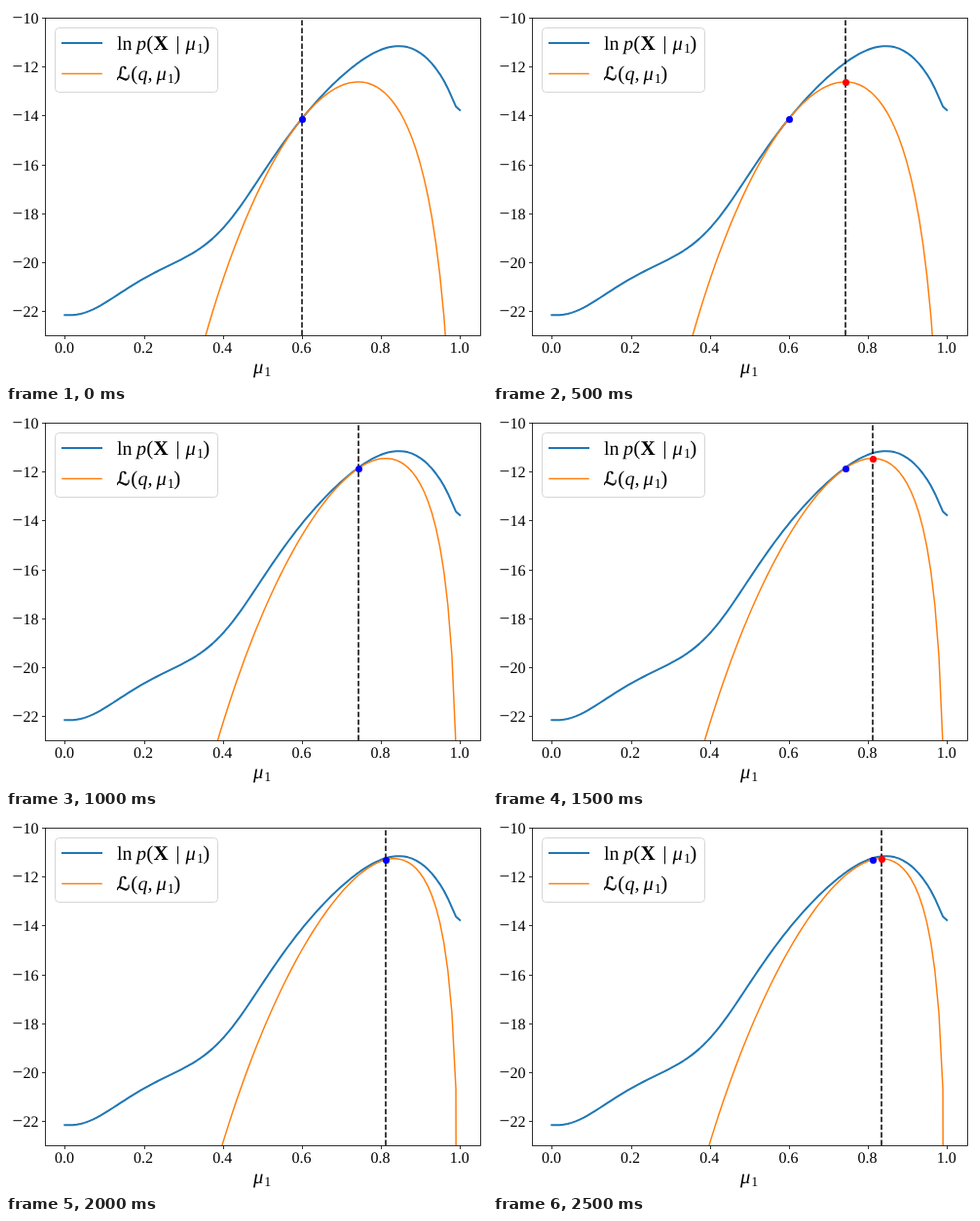
Write an HTML page that moves like this. It is 494 px wide and 387 px high and loops after 3000 ms.

```html
<!DOCTYPE html>
<html lang="en">
<head>
<meta charset="utf-8">
<title>EM lower bound</title>
<style>
  html, body { margin: 0; width: 100%; height: 100%; overflow: hidden; background: #fff; }
  svg { display: block; }
  text { font-family: "Liberation Serif", serif; font-size: 16px; text-rendering: geometricPrecision; }
  .i { font-style: italic; }
  .b { font-weight: bold; }
  .script { font-family: "DejaVu Sans", "DejaVu Serif", sans-serif; stroke: #000; stroke-width: .4px; }
</style>
</head>
<body>
<svg id="plot" width="494" height="387" viewBox="0 0 494 387">
  <clipPath id="area"><rect x="40" y="12" width="447.5" height="326.3"/></clipPath>
  <g clip-path="url(#area)" fill="none" stroke-linejoin="round" stroke-linecap="square">
    <path id="evidence" stroke="#1f77b4" stroke-width="2"/>
    <path id="bound" stroke="#ff7f0e" stroke-width="1.5"/>
    <path id="guide" stroke="#000" stroke-width="1.5" stroke-dasharray="5.55 2.4" stroke-linecap="butt"/>
  </g>
  <circle id="start" r="3.5" fill="#00f"/>
  <circle id="peak" r="3.5" fill="#f00"/>
  <g id="axes" stroke="#000" stroke-width=".8" fill="none">
    <rect x="40.5" y="12.5" width="447" height="326"/>
  </g>
  <g id="legend">
    <rect x="50.5" y="22.5" width="167" height="66" rx="4" fill="#fff" fill-opacity=".8" stroke="#ccc" stroke-opacity=".8"/>
    <path d="M58 38H98" stroke="#1f77b4" stroke-width="2" stroke-linecap="square"/>
    <path d="M58 69.5H98" stroke="#ff7f0e" stroke-width="1.5" stroke-linecap="square"/>
  </g>
  <g id="labels"></g>
</svg>
<script>
const NS = "http://www.w3.org/2000/svg";
const $ = id => document.getElementById(id);

function set(el, attrs) {
  for (const k in attrs) el.setAttribute(k, attrs[k]);
  return el;
}
function add(parent, tag, attrs, text) {
  const el = set(document.createElementNS(NS, tag), attrs);
  if (text) el.textContent = text;
  $(parent).append(el);
}

// Two-coin mixture: heads in five sets of ten tosses.
const heads = [10, 8, 7, 4, 3], tosses = 10;
const weight = 0.6, mu1 = 0.6, mu2 = 0.45;
const EPS = 1e-10, POINTS = 100, STEP = 500;

const px = mu => 60.35 + 405.8 * mu;
const py = v => 12.1 + 25.09 * (-10 - v);
const snap = x => Math.round(x) + 0.5;
const sum = f => heads.reduce((s, h, i) => s + f(h, i), 0);

function choose(n, k) {
  let c = 1;
  for (let i = 1; i <= k; i++) c *= (n - k + i) / i;
  return c;
}
const binom = (h, mu) => choose(tosses, h) * mu ** h * (1 - mu) ** (tosses - h);
const joint = (h, mu, w = weight, other = mu2) => [w * binom(h, mu), (1 - w) * binom(h, other)];
const logLik = mu => sum(h => {
  const [a, b] = joint(h, mu);
  return Math.log(a + b);
});

function curve(f) {
  let d = "";
  for (let i = 0; i < POINTS; i++) {
    const mu = Math.min(1 - EPS, Math.max(EPS, i / (POINTS - 1)));
    d += (i ? "L" : "M") + px(mu).toFixed(2) + " " + py(f(mu)).toFixed(2);
  }
  return d;
}

// One EM round updates all parameters; the bound is drawn over the first coin only.
function round({ w, mu, other }) {
  const q = heads.map(h => {
    const [a, b] = joint(h, mu, w, other);
    return a / (a + b);
  });
  const bound = m => sum((h, i) => {
    const [a, b] = joint(h, m);
    return q[i] * Math.log(a / q[i]) + (1 - q[i]) * Math.log(b / (1 - q[i]));
  });
  const size = sum((h, i) => q[i]), hits = sum((h, i) => q[i] * h);
  const next = {
    w: size / heads.length,
    mu: hits / (tosses * size),
    other: (sum(h => h) - hits) / (tosses * (heads.length - size))
  };
  const dot = m => ({ cx: snap(px(m)), cy: snap(py(bound(m))) });
  return { next, path: curve(bound), from: mu, start: dot(mu), peak: dot(next.mu) };
}
const rounds = [];
for (let i = 0, p = { w: weight, mu: mu1, other: mu2 }; i < 3; i++) {
  rounds.push(round(p));
  p = rounds[i].next;
}

function label(x, y, text, size = 16, cls = "", anchor = "start") {
  add("labels", "text", { x, y, class: cls, "text-anchor": anchor, style: `font-size:${size}px` }, text);
}
for (let i = 0; i <= 5; i++) {
  const x = px(i / 5);
  add("axes", "path", { d: `M${snap(x)} 338.5v3.5` });
  label(x - 0.4, 356, (i / 5).toFixed(1), 16, "", "middle");
}
for (let v = 10; v <= 22; v += 2) {
  const y = snap(py(-v));
  add("axes", "path", { d: `M40.5 ${y}h-3.5` });
  label(17.4, y + 5.5, v);
  label(6.6, y + 5.8, "−", 19);
}

function muOne(x, y) {
  label(x, y, "μ", 20.5, "i");
  label(x + 11.3, y + 3, "1", 14);
}
muOne(254, 377);
label(114, 45, "ln", 20);
label(134, 45, "p", 20, "i");
label(144.3, 45, "(", 21);
label(151.5, 45, "X", 21, "b");
label(174.6, 45, "|", 20);
muOne(184.6, 45);
label(202.2, 45, ")", 21);
label(113.5, 76, "ℒ", 19, "script");
label(128.3, 76, "(", 21);
label(135.5, 76, "q", 20, "i");
label(145.5, 76, ",", 20);
muOne(154.4, 76);
label(172.2, 76, ")", 21);

$("evidence").setAttribute("d", curve(logLik));

let shown = -1;
function show(step) {
  if (step === shown) return;
  shown = step;
  const r = rounds[step >> 1], done = step % 2;
  const x = Math.round(px(done ? r.next.mu : r.from));
  set($("bound"), { d: r.path });
  set($("guide"), { d: `M${x} 338.1V12` });
  set($("start"), r.start);
  set($("peak"), r.peak);
  $("peak").style.display = done ? "" : "none";
}

const t0 = performance.now();
function tick() {
  show(Math.floor((performance.now() - t0) / STEP) % (2 * rounds.length));
  requestAnimationFrame(tick);
}
tick();
</script>
</body>
</html>
```
